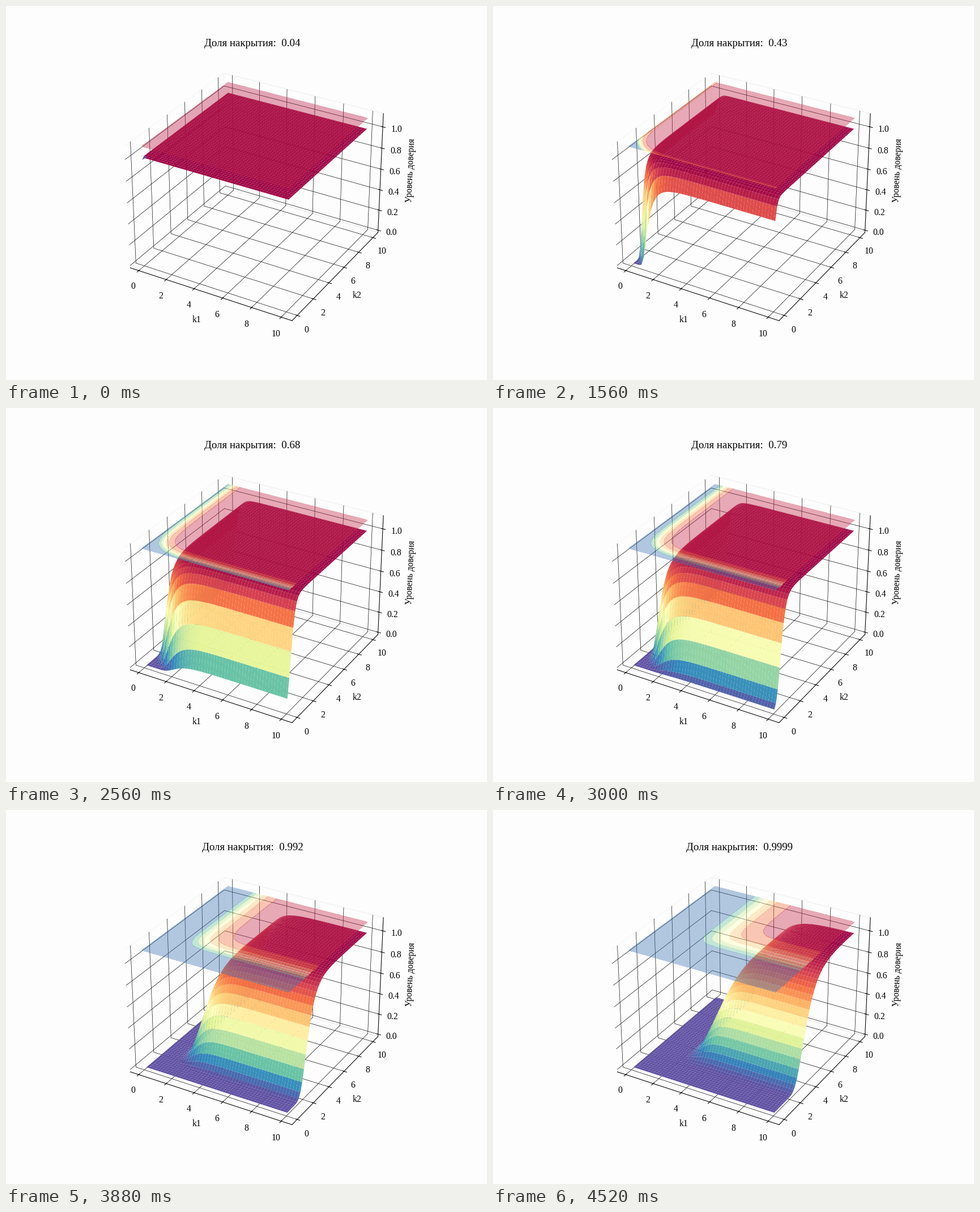
Write a matplotlib script that moves like this. It is 849 by 660 pixels and loops after 4560 ms.

```python
import math

import numpy as np
import matplotlib.pyplot as plt
from matplotlib.animation import FuncAnimation

WIDTH, HEIGHT, DPI = 849, 660, 94.3
INTERVAL = 40
SAMPLE_SIZE = 10
BACKGROUND = "#fdfdfd"

plt.rcParams.update({
    "font.family": "Liberation Serif",
    "font.size": 12,
    "grid.color": "black",
    "grid.linewidth": 0.5,
    "figure.facecolor": BACKGROUND,
    "axes.facecolor": BACKGROUND,
})

# Coverage shares: hundredths up to 0.99, then thousandths, then ten-thousandths.
shares = np.concatenate([
    np.arange(4, 100) / 100,
    np.arange(991, 1000) / 1000,
    np.arange(9991, 10000) / 10000,
])
factors = np.linspace(0.1, 10, 100)


def normal_cdf(x):
    return 0.5 * (1 + np.vectorize(math.erf)(x / math.sqrt(2)))


def confidence_surfaces():
    """P(cdf(m + k2 s) - cdf(m - k1 s) >= share) for a normal sample."""
    dof = SAMPLE_SIZE - 1
    score = np.linspace(-4.2, 4.2, 25)
    mean = score / math.sqrt(SAMPLE_SIZE)
    weight = np.exp(-score ** 2 / 2)
    weight /= weight.sum()

    fine = np.linspace(0, 2.7, 2701)
    density = fine ** (dof - 1) * np.exp(-dof * fine ** 2 / 2)
    fine_cdf = np.cumsum(density) - density / 2
    fine_cdf /= fine_cdf[-1]
    sigma, sigma_cdf = fine[::30], fine_cdf[::30]

    upper = normal_cdf(mean[:, None] + factors[:, None, None] * sigma)
    mirrored = upper[:, ::-1] - 1
    count = len(factors)
    result = np.empty((len(shares), count, count))
    for i in range(count):
        for j in range(i, count):
            coverage = upper[j] + mirrored[i]
            missed = sum(w * np.interp(shares, c, sigma_cdf)
                         for w, c in zip(weight, coverage))
            result[:, i, j] = result[:, j, i] = 1 - missed
    return np.clip(result, 0, 1)


def padded(low, high):
    pad = (high - low) / 48
    return low - pad, high + pad


confidence = confidence_surfaces()
k1, k2 = np.meshgrid(factors, factors)
coarse = np.append(np.arange(0, len(factors), 2), len(factors) - 1)
mesh = np.ix_(coarse, coarse)

# The tiny surplus keeps the pixel size from being truncated.
fig = plt.figure(figsize=((WIDTH + 1e-6) / DPI, (HEIGHT + 1e-6) / DPI), dpi=DPI)
ax = fig.add_subplot(projection="3d", computed_zorder=False)
ax.view_init(elev=30, azim=-60)

margin = 0.05 * (factors[-1] - factors[0])
side = padded(factors[0] - margin, factors[-1] + margin)
ax.set_xlim(*side)
ax.set_ylim(*side)
ax.set_zlim(*padded(0, 1.1))
ax.set_xticks(range(0, 11, 2))
ax.set_yticks(range(0, 11, 2))
ax.set_zticks(np.arange(6) / 5)
ax.set_xlabel("k1")
ax.set_ylabel("k2")
ax.set_zlabel("Уровень доверия")
for axis in (ax.xaxis, ax.yaxis, ax.zaxis):
    axis.pane.fill = False

layers = []


def update(frame):
    for layer in layers:
        layer.remove()
    level = confidence[frame]
    layers[:] = [
        ax.plot_surface(k1[mesh], k2[mesh], level[mesh], cmap="Spectral_r",
                        rstride=1, cstride=1),
        ax.contourf(k1, k2, level, zdir="z", offset=1.1,
                    cmap="Spectral_r", alpha=0.4),
    ]
    ax.set_title(f"Доля накрытия:  {shares[frame]:.4g}")
    return layers


animation = FuncAnimation(fig, update, frames=len(shares), interval=INTERVAL,
                          repeat=True, repeat_delay=0, blit=False)
plt.show()
```
